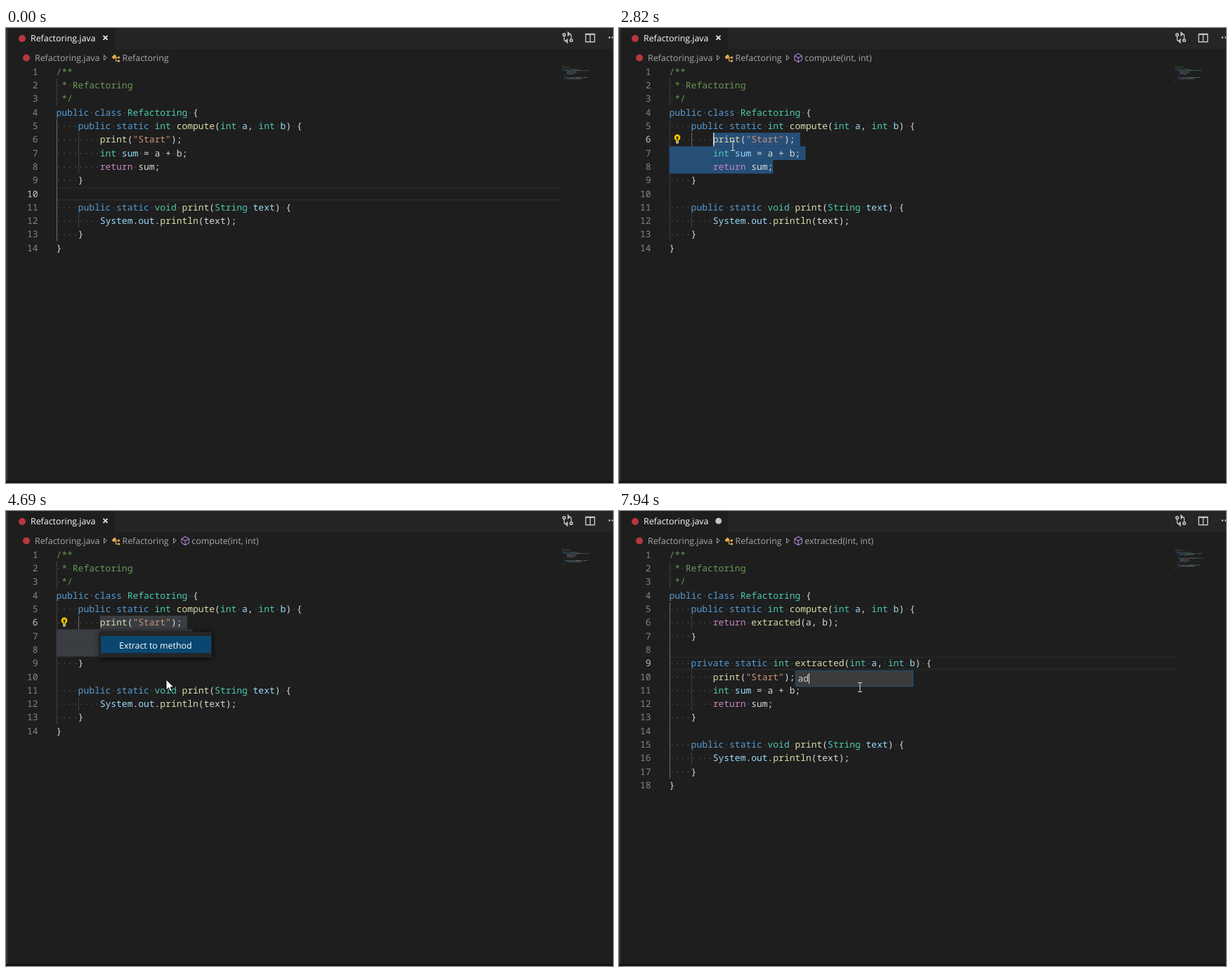
These frames come from a looping animation (864x648 px, 8000 ms). An HTML page with a canvas:

```html
<!DOCTYPE html>
<html lang="en">
<head>
<meta charset="utf-8">
<title>Extract to method</title>
<style>
html, body { margin: 0; width: 100%; height: 100%; overflow: hidden; background: #1e1e1e; }
canvas { display: block; }
</style>
</head>
<body>
<canvas id="stage" width="864" height="648"></canvas>
<script>
const ctx = document.getElementById('stage').getContext('2d');
const LOOP = 8000;
const MONO = '12.97px "Noto Sans Mono", monospace';
const UI = '12.4px "Open Sans", sans-serif';
const LEFT = 71.5, CHAR = 7.78, TOP = 52.65, LINE = 19.3;

const before = `/**
 * Refactoring
 */
public class Refactoring {
    public static int compute(int a, int b) {
        print("Start");
        int sum = a + b;
        return sum;
    }

    public static void print(String text) {
        System.out.println(text);
    }
}`.split('\n');
const after = [
  ...before.slice(0, 5),
  '        return extracted(a, b);', '    }', '',
  '    private static int extracted(int a, int b) {',
  ...before.slice(5),
];

const menuGroups = [
  ['Go to Definition|F12', 'Peek Definition|Alt+F12', 'Go to Type Definition|',
   'Find All References|Shift+Alt+F12', 'Peek References|Shift+F12'],
  ['Rename Symbol|F2', 'Change All Occurrences|Ctrl+F2', 'Format Document|Shift+Alt+F',
   'Format Document With...|', 'Format Selection|Ctrl+K Ctrl+F', 'Refactor...|Ctrl+Shift+R',
   'Source Action...|'],
  ['Cut|Ctrl+X', 'Copy|Ctrl+C', 'Paste|Ctrl+V'],
  ['Command Palette...|Ctrl+Shift+P'],
];

// Pointer moves: first step, last step, step count, end x, end y
const moves = [
  [70, 220, 3, 228, 206], [390, 550, 3, 241, 203], [800, 1490, 10, 158, 178],
  [1560, 1730, 3, 134, 168], [2030, 2030, 1, 129.5, 168], [2260, 2260, 1, 133, 168],
  [2660, 2820, 3, 162, 168], [3450, 3750, 5, 233, 455], [3920, 3920, 1, 235.5, 453.5],
  [4370, 4690, 5, 228, 240], [4770, 4920, 3, 222, 191], [5690, 5990, 5, 343, 251],
];
const presses = [[720, 2430], [2900, 3130], [4070, 4210], [4920, 5000]];

const within = (t, a, b) => t >= a && t < b;

function pointerAt(t) {
  let x = 659, y = 461;
  for (const [start, end, count, toX, toY] of moves) {
    if (t < start) break;
    const gap = count > 1 ? (end - start) / (count - 1) : 1;
    const k = Math.min(count, Math.floor((t - start) / gap + 1e-6) + 1) / count;
    x += (toX - x) * k;
    y += (toY - y) * k;
  }
  return { x, y };
}

function tokenColor(word, prev, next, comment) {
  if (comment) return '#6a9955';
  if (word[0] === '"') return '#ce9178';
  if (word === 'return') return '#c586c0';
  if (/^(public|private|static|class)$/.test(word)) return '#569cd6';
  if (/^(int|void|String|Refactoring)$/.test(word)) return '#4ec9b0';
  if (/^\w/.test(word)) {
    if (next === '(') return '#dcdcaa';
    if (/(int|String) $/.test(prev) || /^(System|out)$/.test(word)) return '#9cdcfe';
  }
  return '#dadada';
}

function tokenize(line) {
  const comment = /^( \*|\/\*)/.test(line);
  return [...line.matchAll(/"[^"]*"|\w+|[^\w\s]/g)].map(m => ({
    text: m[0], col: m.index,
    color: tokenColor(m[0], line.slice(0, m.index), line[m.index + m[0].length], comment),
  }));
}
const tokens = new Map([...before, ...after].map(l => [l, tokenize(l)]));

function rect(x, y, w, h, color) {
  ctx.fillStyle = color;
  ctx.fillRect(x, y, w, h);
}
function dot(x, y, r, color) {
  ctx.fillStyle = color;
  ctx.beginPath();
  ctx.arc(x, y, r, 0, Math.PI * 2);
  ctx.fill();
}
function path(d, x, y, stroke, width = 1, fill) {
  const p = new Path2D(d);
  ctx.save();
  ctx.translate(x, y);
  if (fill) { ctx.fillStyle = fill; ctx.fill(p); }
  if (stroke) { ctx.strokeStyle = stroke; ctx.lineWidth = width; ctx.stroke(p); }
  ctx.restore();
}
function text(str, x, y, color, font = UI, align = 'left') {
  ctx.font = font;
  ctx.fillStyle = color;
  ctx.textAlign = align;
  ctx.fillText(str, x, y + 4.5);
}
function panel(x, y, w, h) {
  ctx.save();
  ctx.shadowColor = '#000';
  ctx.shadowBlur = 7;
  ctx.shadowOffsetY = 1;
  rect(x, y, w, h, '#252526');
  ctx.restore();
}

const colX = col => LEFT + col * CHAR;
const lineY = n => TOP + (n - 1) * LINE;
const depth = line => line ? Math.ceil(line.search(/\S/) / 4) : 1;

function drawChrome(edited) {
  rect(0, 0, 864, 648, '#1e1e1e');
  rect(155, 0, 709, 30, '#252526');
  rect(0, 0, 2.5, 648, '#333');
  rect(0, 645, 864, 3, '#190f16');
  dot(23, 15, 5, '#b5383d');
  text('Refactoring.java', 35, 14.8, '#fff');
  if (edited) dot(141.7, 14.2, 4.4, '#c5c5c5');
  else path('M-3 -3L3 3M3 -3L-3 3', 141.5, 13.8, '#e8e8e8', 1.8);

  const icon = '#c5c5c5';
  path('M2.5 5V10Q2.5 12 5 12H7M12.5 9V4Q12.5 2 10 2H8M7 9.5V14.5L4.5 12ZM8 -.5V4.5L10.5 2Z',
    792, 6.5, icon, 1.3);
  for (const [x, y] of [[794.5, 9.5], [804.5, 17.5]]) {
    dot(x, y, 2.6, icon);
    dot(x, y, 1, '#252526');
  }
  path('M.7 .7H13.3V12H.7ZM7 1V12M0 1.5H14', 824.5, 7.8, icon, 1.4);
  dot(859, 13.5, 1.3, icon);
  dot(863.5, 13.5, 1.3, icon);
}

function drawBreadcrumb(method, fileOnly) {
  const color = '#a9a9a9';
  const chevron = x => path('M0 -3.5L3.8 0L0 3.5Z', x, 42.3, color, 1);
  dot(29, 42.5, 5, '#b5383d');
  text('Refactoring.java', 41, 42.4, color);
  if (fileOnly) return;
  chevron(139.5);
  path('M0 0L4 -4L7 -1L3 3Z', 150.5, 41.5, null, 0, '#e8ab53');
  path('M0 0H4M1 0V4.5H4', 155.5, 42.5, '#e8ab53', 1.2);
  path('M0 -2L2 0L0 2L-2 0ZM0 3L2 5L0 7L-2 5Z', 160.5, 42, null, 0, '#e8ab53');
  text('Refactoring', 165.5, 42.4, color);
  if (!method) return;
  chevron(238.5);
  path('M0 -6L5.3 -3V3L0 6L-5.3 3V-3ZM-5.3 -3L0 0L5.3 -3M0 0V6', 255.2, 42.5, '#a67fcf', 1.1);
  text(method + '(int, int)', 264.3, 42.4, color);
}

function drawGuides(lines, active) {
  const d = depth(lines[active - 1]);
  let first = active - 1, last = first;
  while (first > 0 && depth(lines[first - 1]) >= d) first--;
  while (last < lines.length - 1 && depth(lines[last + 1]) >= d) last++;
  lines.forEach((line, i) => {
    for (let g = 0; g < depth(line); g++) {
      const lit = g === d - 1 && i >= first && i <= last;
      rect(Math.round(colX(g * 4)), lineY(i + 1), 1, LINE, lit ? '#707070' : '#404040');
    }
  });
}

function drawSelection(lines, caret, color) {
  const end = { line: 8, col: 19 };
  for (let n = caret.line; n <= end.line; n++) {
    const from = n === caret.line ? caret.col : 0;
    const to = n === end.line ? end.col : lines[n - 1].length + 0.95;
    if (to > from) rect(colX(from), lineY(n), (to - from) * CHAR, LINE + 0.3, color);
  }
}

function drawCode(lines, active) {
  lines.forEach((line, i) => {
    const y = lineY(i + 1) + LINE / 2;
    text(i + 1, 45.5, y, i + 1 === active ? '#c6c6c6' : '#858585', MONO, 'right');
    [...line].forEach((ch, col) => {
      if (ch === ' ') dot(colX(col + 0.5), y + 0.5, 0.85, '#4b4d4d');
    });
    for (const tok of tokens.get(line)) {
      text(tok.text, colX(tok.col), y, tok.color, MONO);
      ctx.globalAlpha = 0.45;
      rect(791.5 + tok.col * 0.85, 53.6 + i * 1.64, tok.text.length * 0.85, 0.9, tok.color);
      ctx.globalAlpha = 1;
    }
  });
}

function drawBulb() {
  dot(83, 156, 4.4, '#fc0');
  rect(81, 159, 4, 3, '#fc0');
  dot(83, 156, 1.8, '#3a3410');
  rect(82.3, 156, 1.4, 4.5, '#3a3410');
  rect(81, 162.4, 4, 2, '#d0d0d0');
}

function drawMenu(mouse) {
  panel(160, 169, 298, 443);
  let y = 189.4;
  menuGroups.forEach((group, g) => {
    if (g) rect(172, y - 17.6, 275, 1.2, '#606060');
    for (const item of group) {
      const [label, keys] = item.split('|');
      const hover = mouse.y > 176 && Math.abs(mouse.y - y) < 12.7;
      if (hover) rect(161, Math.round(y - 13), 296, 24, '#094771');
      const color = hover ? '#fff' : '#dadada';
      text(label, 187.6, y, color);
      text(keys, 431.6, y, color, UI, 'right');
      y += 25.45;
    }
    y += 7.25;
  });
}

function drawPopup() {
  panel(134, 172, 159, 37);
  rect(135, 178, 157, 24.3, '#094771');
  text('Extract to method', 161, 191, '#fff');
}

function drawRename(t) {
  rect(251, 227.5, 168, 23, '#3c3c3c');
  ctx.strokeStyle = '#1c5078';
  ctx.lineWidth = 1;
  ctx.strokeRect(251.5, 227.5, 167, 22);
  const typed = t < 7460 ? 'extracted' : t < 7940 ? 'a' : 'ad';
  const width = typed.length * CHAR;
  if (t < 7460) rect(254.5, 230, width, 16.5, '#0a63d6');
  else rect(Math.round(254.5 + width), 231, 1, 15, '#ddd');
  text(typed, 254.5, 238.5, t < 7460 ? '#fff' : '#ccc', MONO);
}

function drawPointer({ x, y }, pressed, arrow) {
  if (pressed) dot(x, y, 10, 'rgba(172,174,18,.8)');
  if (arrow) {
    path('M0 0V15L3.5 11.7L5.8 17L8.3 16L6 10.9H10.8Z', x, y, '#111', 1, '#fff');
  } else {
    path('M-3 -6.5H-1Q0 -6.5 0 -5.5Q0 -6.5 1 -6.5H3M0 -5.5V5.5M-3 6.5H-1Q0 6.5 0 5.5Q0 6.5 1 6.5H3',
      x, y, '#d0d0d0', 1.1);
  }
}

function caretAt(t, lines, mouse) {
  if (t < 720) return { line: 10, col: 0 };
  if (t >= 5060) return { line: 9, col: 23 };
  if (t >= 2430) return { line: 6, col: 8 };
  const line = Math.floor((mouse.y - TOP) / LINE) + 1;
  const col = Math.round((mouse.x - LEFT) / CHAR);
  return { line, col: Math.min(col, lines[line - 1].length) };
}

function render(t) {
  const edited = t >= 5060;
  const lines = edited ? after : before;
  const mouse = pointerAt(t);
  const caret = caretAt(t, lines, mouse);
  const menu = within(t, 3050, 4290), popup = within(t, 4450, 5000);
  const selecting = within(t, 800, 5060);
  const blurred = within(t, 2900, 4290) || popup;
  const method = t < 720 ? '' : edited ? 'extracted' : 'compute';

  drawChrome(edited);
  drawBreadcrumb(method, within(t, 5060, 5690));

  if (!selecting) {
    const y = lineY(caret.line);
    rect(72, y + 0.6, 720, 1.4, '#2a2a2a');
    rect(72, y + LINE - 1.6, 720, 1.4, '#2a2a2a');
  }
  drawGuides(lines, caret.line);
  if (selecting) drawSelection(lines, caret, blurred ? '#3a3d41' : '#264f78');
  drawCode(lines, caret.line);
  if (within(t, 720, 5060) && !blurred) {
    rect(Math.round(colX(caret.col)), lineY(caret.line), 1.5, LINE, '#d0d0cc');
  }
  if (within(t, 2030, 5060)) drawBulb();
  if (menu) drawMenu(mouse);
  if (popup) drawPopup();
  if (t >= 5520) drawRename(t);
  if (t >= 70) drawPointer(mouse, presses.some(([a, b]) => within(t, a, b)), menu || popup);
}

ctx.textRendering = 'geometricPrecision';
ctx.textBaseline = 'alphabetic';
const began = performance.now();
function tick() {
  render((performance.now() - began) % LOOP);
  requestAnimationFrame(tick);
}
tick();
</script>
</body>
</html>
```
